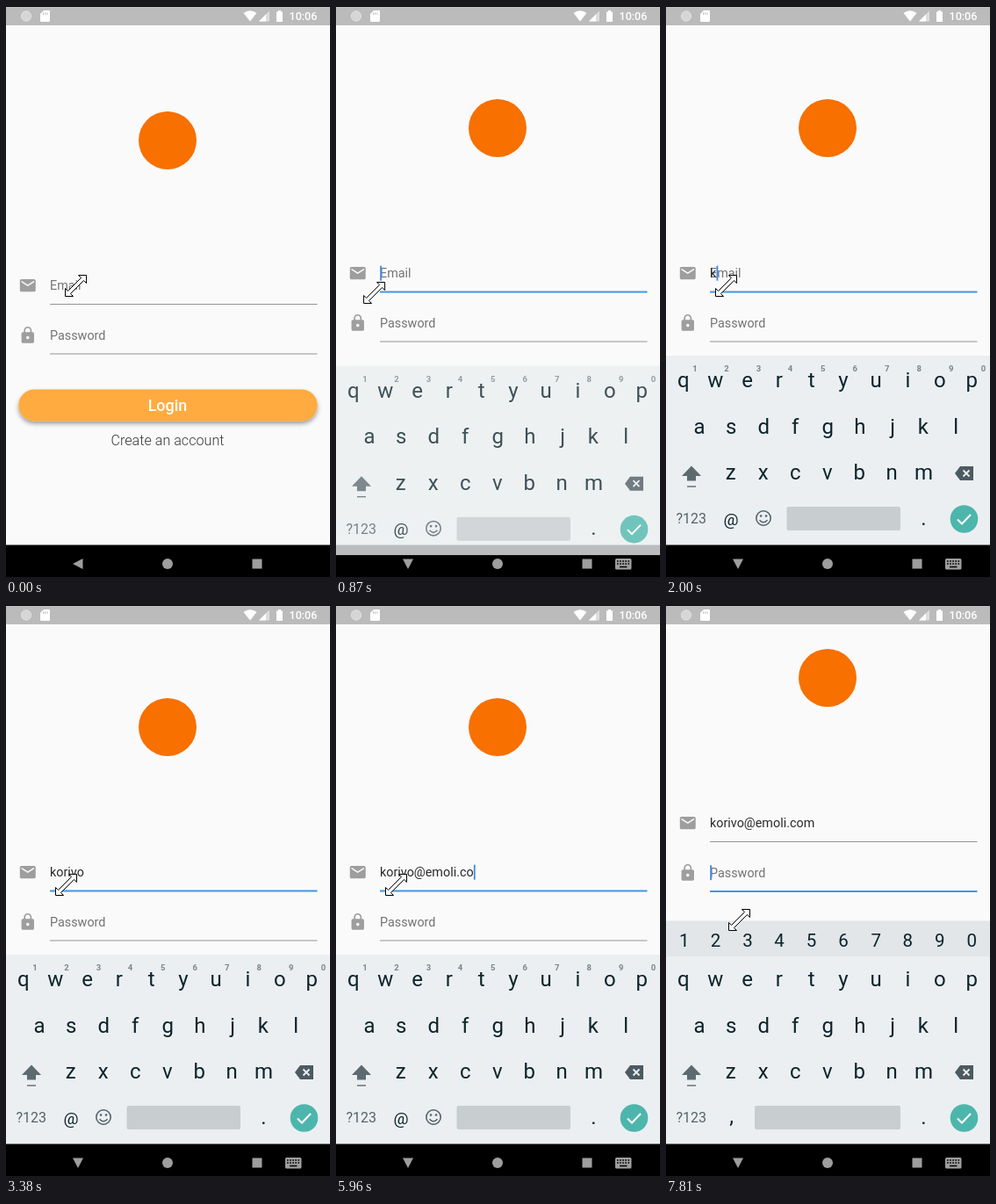
An HTML page that plays this animation: 369 px wide and 650 px high, repeating every 8 s.

```html
<!DOCTYPE html>
<html lang="en">
<head>
<meta charset="utf-8">
<title>Login form</title>
<style>
  html, body { margin: 0; width: 100%; height: 100%; overflow: hidden; background: #fafafa; }
  svg { display: block; width: 100%; height: 100%; font-family: Roboto, sans-serif; }
  .field { font-size: 14.37px; fill: #737373; }
  .typed { fill: #2a2a2a; }
  .icon { fill: #9e9e9e; }
  .mid { text-anchor: middle; }
  .key { font-size: 24px; fill: #0c242c; }
  .digit { font-size: 20.5px; fill: #0c242c; }
  .sup { font-size: 9.5px; font-weight: 700; fill: #79858a; }
</style>
</head>
<body>
<svg viewBox="0 0 369 650">
  <defs>
    <filter id="shadow" x="-10%" y="-30%" width="120%" height="180%">
      <feDropShadow dx="0" dy="3" stdDeviation="2.4" flood-opacity=".38"/>
    </filter>
  </defs>
  <rect width="369" height="650" fill="#fafafa"/>

  <g id="page">
    <circle cx="184" cy="153" r="33" fill="#f77000"/>
    <g class="icon">
      <path transform="translate(14 307.4) scale(.898)" d="M20 4H4c-1.1 0-2 .9-2 2v12c0 1.1.9 2 2 2h16c1.1 0 2-.9 2-2V6c0-1.1-.9-2-2-2zm0 4l-8 5-8-5V6l8 5 8-5z"/>
      <path transform="translate(14 364) scale(.898)" d="M18 8h-1V6c0-2.76-2.24-5-5-5S7 3.24 7 6v2H6c-1.1 0-2 .9-2 2v10c0 1.1.9 2 2 2h12c1.1 0 2-.9 2-2V10c0-1.1-.9-2-2-2zm-6 9c-1.1 0-2-.9-2-2s.9-2 2-2 2 .9 2 2-.9 2-2 2zm3.1-9H8.9V6c0-1.71 1.39-3.1 3.1-3.1s3.1 1.39 3.1 3.1z"/>
    </g>
    <text id="hint" class="field" x="50" y="323.3">Email</text>
    <text id="email" class="field typed" x="50" y="323.3"></text>
    <text class="field" x="50" y="379.8">Password</text>
    <path id="emailLine" d="M50 339.5H354.500"/>
    <path id="passLine" d="M50 396H354.500"/>
    <rect id="caret" width="1.8" height="17" fill="#3f88ea"/>
    <g id="actions">
      <rect x="14.300" y="436.400" width="340.400" height="36" rx="18" fill="#ffab40" filter="url(#shadow)"/>
      <text class="mid" x="184" y="461" font-size="17.95" font-weight="500" fill="#fff">Login</text>
      <text class="mid" x="184" y="500" font-size="16.16" font-weight="300" fill="#3a3a3a">Create an account</text>
    </g>
  </g>

  <g id="status" fill="#fff">
    <rect width="369" height="22" fill="#bbb"/>
    <rect width="369" height="1" fill="#000"/>
    <circle cx="23" cy="11.5" r="5.6" fill="#d6d6d6" stroke="#e4e4e4"/>
    <path d="M43 5h6q1 0 1 1v11q0 1-1 1h-9q-1 0-1-1V9z"/>
    <path d="M42.5 7.5v2.5M44.7 7.5v2.5M47 7.5v2.5" stroke="#bbb"/>
    <path d="M270.5 8Q278 2.5 285.5 8L278 17.5z"/>
    <path d="M288 17.5L300 5.5V17.5z" opacity=".5"/>
    <path d="M288 17.5L296 9.5V17.5z"/>
    <path d="M308 6.5h2V5h3v1.5h2V18h-7z"/>
    <text x="322.5" y="16" font-size="12.57" font-weight="500">10:06</text>
  </g>

  <rect y="613.500" width="369" height="37"/>
  <g id="keyboard">
    <rect y="398" width="369" height="216" fill="#eceff1"/>
    <rect y="613.500" width="369" height="60"/>
    <g id="letters"></g>
    <path d="M29 523.5L40 535H34V540.5H24V535H18z" fill="#5d6b71"/>
    <path d="M24 547H34" stroke="#5d6b71" stroke-width="1.4"/>
    <path d="M329 532L335 524H350V540H335z" fill="#4c5b62"/>
    <path d="M338.5 528.5l7 7m0-7l-7 7" stroke="#eceff1" stroke-width="1.8"/>
    <text class="mid" x="28.7" y="589" font-size="16" fill="#54636a">?123</text>
    <text class="mid key" x="293.5" y="590.5">.</text>
    <circle cx="339.5" cy="584" r="15.800" fill="#4db6ac"/>
    <path d="M332 584.5l5 5 10-10.5" fill="none" stroke="#fff" stroke-width="2"/>
    <g id="emailKeys">
      <g id="sups"></g>
      <text class="mid" x="74" y="590.5" font-size="19" fill="#0c242c">@</text>
      <g fill="none" stroke="#54636a" stroke-width="1.6">
        <circle cx="111" cy="583" r="8.2"/>
        <path d="M106.5 585.2q4.500 5 9 0"/>
      </g>
      <path d="M108 580.5h.1M114 580.5h.1" stroke="#54636a" stroke-width="2.6" stroke-linecap="round"/>
      <rect x="137.500" y="570" width="129.500" height="27" rx="2" fill="#c8cdd0"/>
    </g>
    <g id="passKeys">
      <rect y="359.5" width="369" height="40.5" fill="#e2e6e9"/>
      <g id="digits"></g>
      <text class="mid key" x="74.500" y="590">,</text>
      <rect x="101" y="570" width="166" height="27" rx="2" fill="#c8cdd0"/>
    </g>
  </g>

  <g id="nav" class="icon">
    <path id="back" d="M76 635L87.500 629V641z"/>
    <circle cx="184" cy="635" r="6"/>
    <rect x="280.500" y="629.500" width="11" height="11"/>
    <g id="switcher">
      <rect x="318" y="629" width="18.500" height="12.500" rx="1.500"/>
      <path d="M320 632h14.500M320 635h14.500" stroke="#000" stroke-width="1.500" stroke-dasharray="1.700 1.400"/>
      <path d="M323 638.500h8.500" stroke="#000" stroke-width="1.500"/>
    </g>
  </g>

  <path id="pointer" d="M12-12V-3L9-6-6 9-3 12H-12V3L-9 6 6-9 3-12z" fill="#fff" stroke="#000"/>
</svg>
<script>
const $ = id => document.getElementById(id);
const LOOP = 8000, KEYBOARD = 790, PASSWORD = 7490, NUMBERS = 7590;
const ADDRESS = 'korivo@emoli.com';
const KEY_TIMES = [2000, 2180, 2260, 2590, 2770, 2870, 4220, 4530,
                   4580, 4910, 5090, 5320, 5600, 5830, 5960, 6240];
// time, x, y of the pointer's centre
const PATH = [
  [129, 79.5, 318.5], [130, 73.5, 323.5], [229, 73.5, 323.5], [230, 84.5, 312.5],
  [640, 84.5, 312.5], [870, 43.5, 326.5], [1000, 57.5, 323.5], [1050, 59.5, 323.5],
  [1199, 59.5, 323.5], [1250, 64, 309.5], [1340, 68.5, 318.5], [6660, 68.5, 318.5],
  [6900, 74, 340], [7120, 80, 363], [7310, 83.5, 357.5], [7410, 83.5, 358.5]
];

// Key labels are centred on their visible ink rather than their advance width.
const STEP = 36.55;
const ruler = document.createElement('canvas').getContext('2d');
function row(chars, cls, size, x, y) {
  ruler.font = `${size}px Roboto, sans-serif`;
  return [...chars].map((c, i) => {
    const ink = ruler.measureText(c);
    const offset = (ink.actualBoundingBoxRight - ink.actualBoundingBoxLeft) / 2;
    return `<text class="${cls}" x="${x + i * STEP - offset}" y="${y}">${c}</text>`;
  }).join('');
}
$('letters').innerHTML = row('qwertyuiop', 'key', 24, 19.6, 434) +
  row('asdfghjkl', 'key', 24, 37.9, 486.6) + row('zxcvbnm', 'key', 24, 74.3, 539.3);
$('sups').innerHTML = row('1234567890', 'sup', 9.5, 32.2, 416);
$('digits').innerHTML = row('1234567890', 'digit', 20.5, 19.6, 388.5);

const clamp = v => Math.min(1, Math.max(0, v));
const easeOut = v => 1 - (1 - v) ** 2;
const smooth = v => v * v * (3 - 2 * v);
const progress = (t, start, length) => clamp((t - start) / length);
const show = (id, on) => $(id).setAttribute('display', on ? 'inline' : 'none');
const move = (id, x, y) => $(id).setAttribute('transform', `translate(${x} ${y})`);

function pointerAt(t) {
  const next = PATH.findIndex(p => p[0] >= t);
  if (next <= 0) return (next ? PATH[PATH.length - 1] : PATH[0]).slice(1);
  const [a, b] = [PATH[next - 1], PATH[next]];
  const k = (t - a[0]) / (b[0] - a[0]);
  return [1, 2].map(i => a[i] + (b[i] - a[i]) * k);
}

function underline(id, focused) {
  $(id).setAttribute('stroke', focused ? '#4297e4' : '#959595');
  $(id).setAttribute('stroke-width', focused ? 1.8 : 1);
}

function draw(t) {
  const open = t >= KEYBOARD, inPassword = t >= PASSWORD, numbers = t >= NUMBERS;
  const rise = easeOut(progress(t, KEYBOARD, 150));
  const scroll = 14 * smooth(progress(t, KEYBOARD, 75)) + 56 * smooth(progress(t, 7630, 180));
  move('page', 0, -scroll);
  move('keyboard', 0, 55 * (1 - rise));
  $('keyboard').setAttribute('opacity', rise);
  show('actions', !open);
  show('switcher', open);
  $('back').setAttribute('transform', open ? 'rotate(-90 82 635)' : '');
  show('emailKeys', !numbers);
  show('passKeys', numbers);

  const typed = KEY_TIMES.filter(k => k <= t).length;
  $('email').textContent = ADDRESS.slice(0, typed);
  show('hint', typed < 2);
  underline('emailLine', open && !inPassword);
  underline('passLine', inPassword);

  const blinkOn = typed ? (t - KEY_TIMES[typed - 1]) % 970 < 505 : t < 1340;
  show('caret', open && (inPassword || blinkOn));
  const textWidth = typed && !inPassword ? $('email').getComputedTextLength() : 0;
  move('caret', 50.2 + textWidth, inPassword ? 366.2 : 309.7);

  move('pointer', ...pointerAt(t));
}

function frame() {
  draw(performance.now() % LOOP);
  requestAnimationFrame(frame);
}
frame();
</script>
</body>
</html>
```
